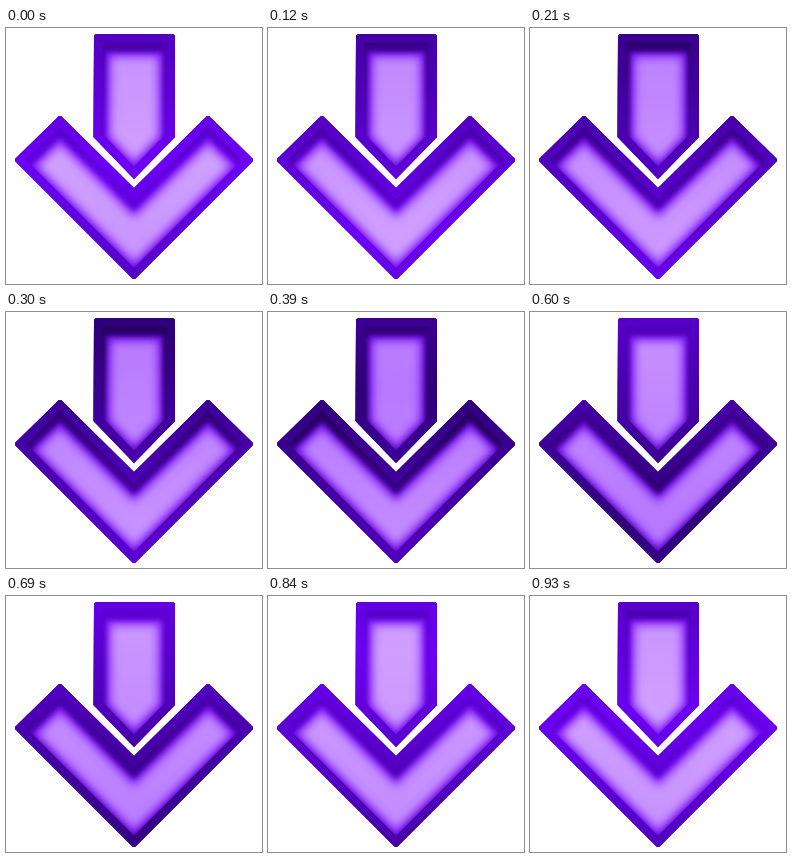
Animation, 256 px wide and 256 px high, one loop 0.96 s. Source, as an HTML page without scripts:

```html
<!DOCTYPE html>
<html lang="en">
<head>
<meta charset="utf-8">
<title>Glowing arrow</title>
<style>
  html, body { margin: 0; width: 100%; height: 100%; overflow: hidden; background: #fff; }
  svg { display: block; width: 100vw; height: 100vh; }
  use { fill: none; }
</style>
</head>
<body>
<svg viewBox="0 0 256 256">
  <defs>
    <path id="arrow" d="M90 6H167L169 8V109L128 151 87.5 109 88 8Z
      M53 88H55L128 160 201 88H203L247 131V133L129 251H127L9 133V131Z"/>
    <clipPath id="inside"><use href="#arrow"/></clipPath>
    <filter id="soft" filterUnits="userSpaceOnUse" x="-40" y="-40" width="336" height="336" color-interpolation-filters="sRGB">
      <feGaussianBlur stdDeviation="5"/>
    </filter>
    <filter id="crisp" filterUnits="userSpaceOnUse" x="-40" y="-40" width="336" height="336" color-interpolation-filters="sRGB">
      <feGaussianBlur stdDeviation="2.5"/>
    </filter>

    <!-- Dark waves travelling down, one period per loop -->
    <linearGradient id="core" gradientUnits="userSpaceOnUse" x1="0" y1="0" x2="0" y2="620" spreadMethod="repeat">
      <stop offset="0" stop-color="#b878ff"/>
      <stop offset=".5" stop-color="#d0a0ff"/>
      <stop offset="1" stop-color="#b878ff"/>
      <animateTransform attributeName="gradientTransform" type="translate" from="0 -177" to="0 443" dur=".96s" repeatCount="indefinite"/>
    </linearGradient>
    <linearGradient id="glow" gradientUnits="userSpaceOnUse" x1="0" y1="0" x2="0" y2="620" spreadMethod="repeat">
      <stop offset="0" stop-color="#6c08e8"/>
      <stop offset=".5" stop-color="#8820ff"/>
      <stop offset="1" stop-color="#6c08e8"/>
      <animateTransform attributeName="gradientTransform" type="translate" from="0 -177" to="0 443" dur=".96s" repeatCount="indefinite"/>
    </linearGradient>
    <linearGradient id="shade" gradientUnits="userSpaceOnUse" x1="0" y1="0" x2="0" y2="620" spreadMethod="repeat">
      <stop offset="0" stop-color="#24005c"/>
      <stop offset=".5" stop-color="#6400e4"/>
      <stop offset="1" stop-color="#24005c"/>
      <animateTransform attributeName="gradientTransform" type="translate" from="0 -167" to="0 453" dur=".96s" repeatCount="indefinite"/>
    </linearGradient>
    <linearGradient id="band" gradientUnits="userSpaceOnUse" x1="0" y1="0" x2="0" y2="620" spreadMethod="repeat">
      <stop offset="0" stop-color="#2e0078"/>
      <stop offset=".5" stop-color="#6c00f4"/>
      <stop offset="1" stop-color="#2e0078"/>
      <animateTransform attributeName="gradientTransform" type="translate" from="0 -177" to="0 443" dur=".96s" repeatCount="indefinite"/>
    </linearGradient>
  </defs>

  <g clip-path="url(#inside)">
    <use href="#arrow" style="fill:url(#core)"/>
    <!-- Inner shadow falls downwards -->
    <g transform="translate(0 6)">
      <use href="#arrow" stroke="url(#glow)" stroke-width="33" filter="url(#soft)"/>
      <use href="#arrow" stroke="url(#shade)" stroke-width="24" filter="url(#crisp)"/>
    </g>
    <use href="#arrow" stroke="url(#band)" stroke-width="17"/>
  </g>
</svg>
</body>
</html>
```
